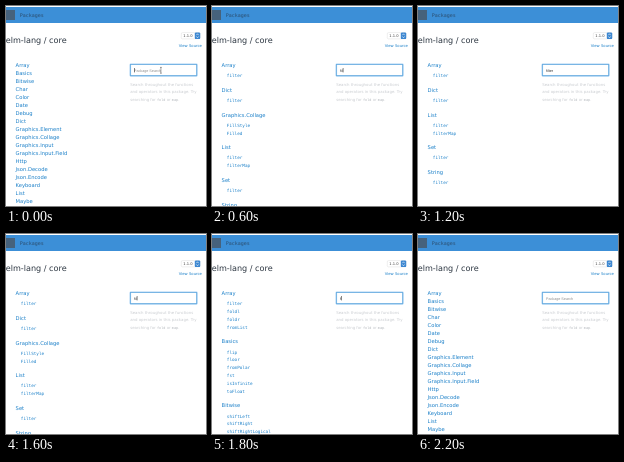
An HTML page that plays this animation: 200x200 px, repeating every 2.4 s.

```html
<!DOCTYPE html>
<html lang="en">
<head>
<meta charset="utf-8">
<title>Package search</title>
<style>
  html, body { margin: 0; width: 100%; height: 100%; overflow: hidden; background: #fff; }
  svg { display: block; width: 100%; height: 100%; }
  text { font-family: "DejaVu Sans", sans-serif; text-rendering: geometricPrecision; white-space: pre; }
  .mono { font-family: "DejaVu Sans Mono", monospace; }
  .link { fill: #1a7fc8; }
  .module { font-size: 5.2px; }
  .value { font-size: 4.3px; }
  .title { font-size: 8.1px; fill: #2b3540; }
  .hint { font-size: 3.9px; fill: #c9ccd0; }
  .hint .mono { font-size: 3.5px; fill: #b4b8bd; }
  .footer { font-size: 4px; fill: #c4c8cc; }
  #query { font: 3.7px "Liberation Sans", sans-serif; }
</style>
</head>
<body>
<svg viewBox="0 0 200 200">
  <rect y="1" width="200" height="16" fill="#3c8fd7"/>
  <rect y="4" width="9" height="10" fill="#46627c"/>
  <text class="mono" x="13.8" y="11.1" font-size="5" fill="#2c4f70">Packages</text>

  <text class="title" x="-0.3" y="37.2">elm-lang / core</text>

  <rect x="175.3" y="26.6" width="18.8" height="6.3" rx="1.2" fill="#fff" stroke="#d4d4d4" stroke-width=".4"/>
  <text x="177.3" y="31.1" font-size="3.7" fill="#444">1.1.0</text>
  <rect x="188.8" y="26.4" width="5.4" height="6.7" rx="1.2" fill="#3b86d0"/>
  <path d="M190.3 29.2l1.2-1.4 1.2 1.4M190.3 30.4l1.2 1.4 1.2-1.4" fill="none" stroke="#fff" stroke-width=".6"/>
  <text class="link" x="172.7" y="41.4" font-size="3.8">View Source</text>

  <rect x="124.3" y="58.3" width="66.6" height="11.6" rx=".6" fill="#fff" stroke="#a9d2f3" stroke-width="1.6"/>
  <rect x="124.5" y="58.5" width="66.2" height="11.2" fill="none" stroke="#66aade" stroke-width=".7"/>
  <text id="query" x="128" y="65.7"></text>
  <rect id="caret" y="62" width=".6" height="4.4" fill="#333"/>
  <path id="pointer" d="M154 61.4h1.8M154.9 61.4v5.8M154 67.2h1.8" fill="none" stroke="#444" stroke-width=".5"/>

  <g class="hint">
    <text x="124.2" y="79.9">Search throughout the functions</text>
    <text x="124.2" y="87.4">and operators in this package. Try</text>
    <text x="124.2" y="94.9">searching for <tspan class="mono">fold</tspan> or <tspan class="mono">map</tspan>.</text>
  </g>

  <g id="results"></g>
</svg>
<script>
const LOOP = 2400;

// [start ms, query, caret shown, pointer shown]
const STEPS = [
  [0, "", true, true],
  [200, "", false, true],
  [500, "", false, false],
  [600, "fil", true, false],
  [800, "filt", true, false],
  [900, "filter", true, false],
  [1200, "filter", false, false],
  [1400, "filte", true, false],
  [1500, "filt", true, false],
  [1600, "fil", true, false],
  [1700, "fi", true, false],
  [1800, "f", true, false],
  [1900, "", true, false],
  [2200, "", false, false],
];

const MODULES = {
  "Array": "filter foldl foldr fromList",
  "Basics": "flip floor fromPolar fst isInfinite toFloat",
  "Bitwise": "shiftLeft shiftRight shiftRightLogical",
  "Char": "", "Color": "", "Date": "", "Debug": "",
  "Dict": "filter foldl foldr fromList",
  "Graphics.Element": "fittedImage",
  "Graphics.Collage": "FillStyle Filled",
  "Graphics.Input": "", "Graphics.Input.Field": "", "Http": "",
  "Json.Decode": "", "Json.Encode": "", "Keyboard": "",
  "List": "filter filterMap foldl foldr",
  "Maybe": "",
  "Set": "filter foldl foldr fromList",
  "String": "filter foldl foldr fromList",
};

const SEARCH_ORDER = Object.keys(MODULES).sort();
const FIRST_LINE = 60.9, ROW = 8, ITEM = 7.85, GROUP = 16.95;

const byId = id => document.getElementById(id);
const queryText = byId("query"), caret = byId("caret");
const pointer = byId("pointer"), results = byId("results");

const line = (cls, x, y, text) => `<text class="${cls}" x="${x}" y="${y}">${text}</text>`;

function listAll() {
  return Object.keys(MODULES)
    .filter(name => name !== "Set" && name !== "String")
    .map((name, i) => line("link module", 9.6, FIRST_LINE + i * ROW, name))
    .join("");
}

function search(query) {
  let y = FIRST_LINE, out = "";
  for (const name of SEARCH_ORDER) {
    const hits = MODULES[name].split(" ").filter(v => v.toLowerCase().includes(query));
    if (!hits.length) continue;
    out += line("link module", 9.6, y, name);
    hits.forEach((hit, i) => out += line("link value mono", 14.8, y + 10.3 + i * ITEM, hit));
    y += GROUP + hits.length * ITEM;
  }
  return out + line("footer", 6, y + 10.9, "All code for this site is open source and written in Elm.");
}

function show([, query, caretOn, pointerOn]) {
  queryText.textContent = query || "Package Search";
  queryText.setAttribute("fill", query ? "#333" : "#8c8c8c");
  const width = query ? queryText.getComputedTextLength() : 0;
  caret.setAttribute("x", 128.1 + width);
  caret.setAttribute("visibility", caretOn ? "visible" : "hidden");
  pointer.setAttribute("visibility", pointerOn ? "visible" : "hidden");
  results.innerHTML = query ? search(query) : listAll();
}

const start = performance.now();
let current;

function tick() {
  const time = (performance.now() - start) % LOOP;
  const step = STEPS.findLast(([at]) => at <= time);
  if (step !== current) show(current = step);
  requestAnimationFrame(tick);
}
tick();
</script>
</body>
</html>
```
